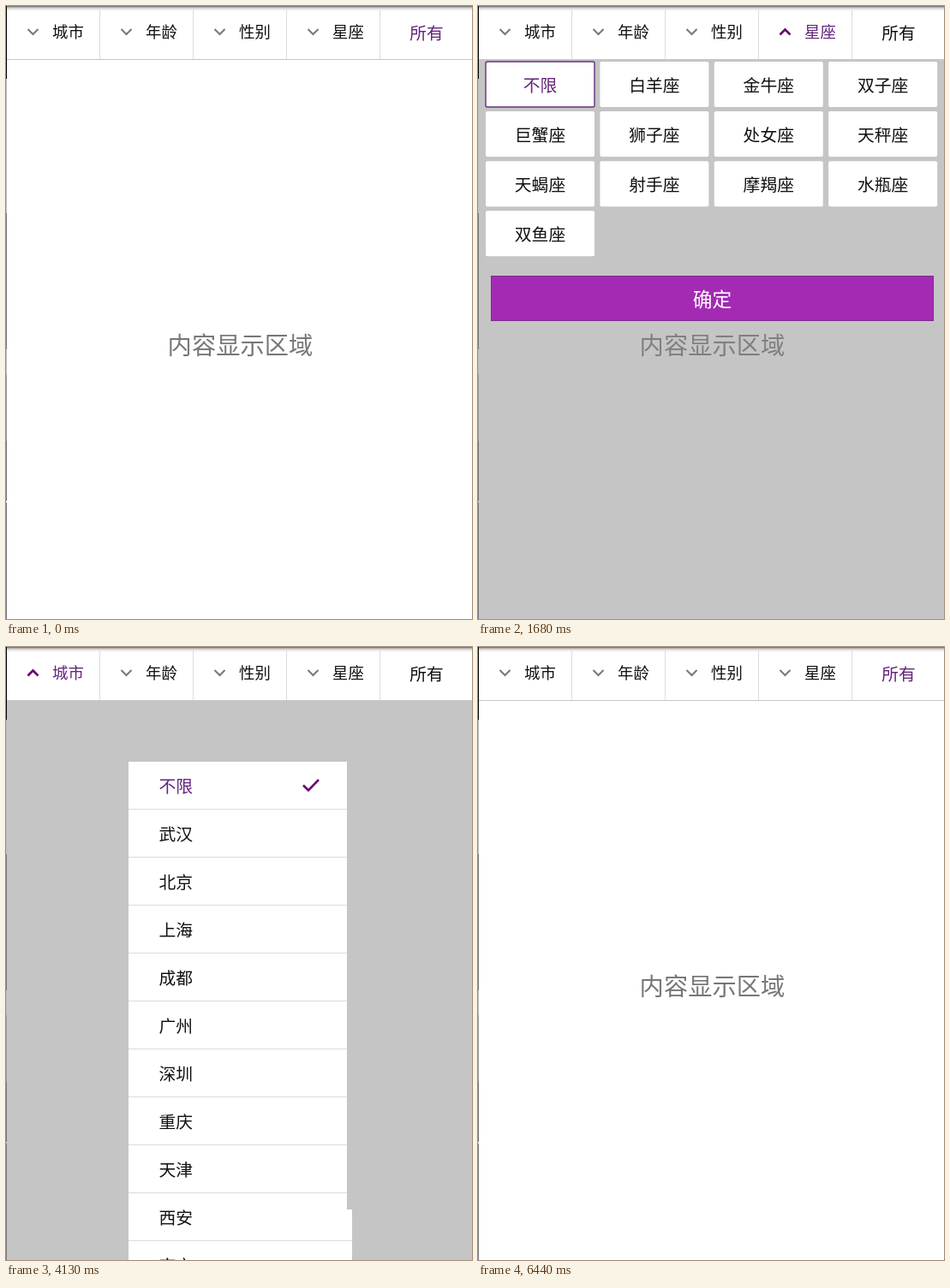
These frames come from a looping animation (544 px wide and 716 px high, 7.91 s). An HTML page:

```html
<!DOCTYPE html>
<html lang="zh-CN">
<head>
<meta charset="utf-8">
<title>筛选菜单</title>
<style>
  html, body { margin: 0; width: 100%; height: 100%; overflow: hidden; background: #fff; }
  svg { display: block; width: 544px; height: 716px; }
  text { font-family: "Noto Sans CJK SC", "Noto Sans CJK", "Noto Sans", sans-serif; fill: #111; }
  .mid { text-anchor: middle; }
  .on { fill: #64237c; }
  .hint { fill: #777; }
  .light { fill: #fff; }
  .line { fill: #dcdcdc; }
  .arrow { fill: none; stroke: #777; stroke-width: 2; }
  .tab.active text { fill: #64237c; }
  .tab.active .arrow { stroke: #6b0a72; stroke-width: 2.7; }
  .check { fill: none; stroke: #6b0a72; stroke-width: 2.6; }
  .panel { display: none; }
  .panel.show { display: inline; }
</style>
</head>
<body>
<svg viewBox="0 0 544 716">
  <defs>
    <clipPath id="below"><rect y="62" width="544" height="654"/></clipPath>
    <clipPath id="list"><rect x="143" y="134" width="261" height="593"/></clipPath>
    <linearGradient id="shade" x2="0" y2="1">
      <stop offset="0" stop-color="#555"/>
      <stop offset=".2" stop-color="#aaa"/>
      <stop offset=".55" stop-color="#e4e4e4"/>
      <stop offset="1" stop-color="#fff"/>
    </linearGradient>
  </defs>
  <rect width="544" height="716" fill="#fff"/>
  <g id="content"></g>
  <rect id="mask" y="62" width="544" height="654" fill="#888" opacity="0"/>
  <g clip-path="url(#below)"><g id="panels"></g></g>
  <g id="header"></g>
  <g id="edge"></g>
</svg>
<script>
const LOOP = 7910, STEP = 70, SLIDE = 350, DROP = 833;
const OPEN = 1330, CLOSE = 6090;
const SWITCH = [[OPEN, 3], [2450, 2], [3360, 1], [4130, 0], [CLOSE, 4]];

const $ = id => document.getElementById(id);
const rect = (x, y, w, h, attrs = '') =>
  `<rect x="${x}" y="${y}" width="${w}" height="${h}" ${attrs}/>`;
// cy is the middle of the glyphs
const text = (x, cy, size, str, cls = '') =>
  `<text x="${x}" y="${(cy + size * 0.38).toFixed(2)}" font-size="${size}" class="${cls}">${str}</text>`;

function rowPanel(items) {
  return items.map((s, i) => {
    const y = 63 + i * 56;
    return rect(0, y, 544, 56, `fill="${i ? '#fff' : '#f4f4f4'}"`) +
      rect(0, y + 55, 544, 1, 'class="line"') +
      text(273.5, y + 28, 19.8, s, i ? 'mid' : 'mid on');
  }).join('');
}

function cityPanel(items) {
  const rows = items.map((s, i) => {
    const y = 134 + i * 56;
    return rect(143, y + 55, 261, 1, 'class="line"') +
      text(178.5, y + 28, 19.8, s, i ? '' : 'on');
  }).join('');
  return `<g clip-path="url(#list)">${rect(143, 134, 261, 593, 'fill="#fff"')}${rows}</g>` +
    '<path class="check" d="M347 161.5l6 6 12-12.5"/>' +
    rect(398, 134, 6, 523, 'id="bar" fill="#cdcdcd"');
}

function gridPanel(items) {
  const cells = items.map((s, i) => {
    const x = 9 + (i % 4) * 133.4, y = 65 + Math.floor(i / 4) * 58.1;
    const edge = i ? '' : 'stroke="#64307f" stroke-width="1.4"';
    return rect(x, y, 127, 53, `rx="2" fill="#fff" ${edge}`) +
      text(x + 63.5, y + 27, 19.8, s, i ? 'mid' : 'mid on');
  }).join('');
  return cells +
    rect(15.5, 315.5, 516, 52, 'fill="#a42ab4" stroke="#7d2a8c"') +
    text(273.5, 342, 22.7, '确定', 'mid light');
}

function tab(name, i) {
  const x = i * 109;
  return `<g class="tab"><path class="arrow"/>${text(x + 54, 30.5, 18.4, name)}</g>` +
    rect(x + 109, 4, 1, 58, 'class="line"');
}

$('content').innerHTML = text(273.5, 396.5, 28.3, '内容显示区域', 'mid hint');
$('panels').innerHTML = [
  cityPanel(['不限', '武汉', '北京', '上海', '成都', '广州', '深圳', '重庆', '天津', '西安', '南京', '杭州']),
  rowPanel(['不限', '18岁以下', '18-22岁', '23-26岁', '27-35岁', '35岁以上']),
  rowPanel(['不限', '男', '女']),
  gridPanel(['不限', '白羊座', '金牛座', '双子座', '巨蟹座', '狮子座', '处女座',
    '天秤座', '天蝎座', '射手座', '摩羯座', '水瓶座', '双鱼座'])
].map(p => `<g class="panel">${p}</g>`).join('');
$('header').innerHTML = rect(0, 0, 544, 62, 'fill="#fff"') +
  rect(0, 0, 544, 6, 'fill="url(#shade)"') +
  ['城市', '年龄', '性别', '星座'].map(tab).join('') +
  `<g class="tab">${text(491, 31, 19.8, '所有', 'mid')}</g>` +
  rect(0, 62, 544, 1, 'fill="#c6c6c6"');
$('edge').innerHTML = [[0, 85, '#000'], [85, 157, '#bbb'], [242, 159, '#777'],
  [401, 29, '#bbb'], [430, 78, '#999'], [508, 70, '#776f74'], [580, 136, '#777']]
  .map(([y, h, c]) => rect(0, y, 1, h, `fill="${c}"`)).join('');

const tabs = [...document.querySelectorAll('.tab')];
const panels = [...document.querySelectorAll('.panel')];

const ease = (t, start) => {
  const k = Math.min(1, Math.max(0, (t - start) / SLIDE));
  return (1 - Math.cos(Math.PI * k)) / 2;
};

function draw(t) {
  const active = SWITCH.reduce((now, [at, i]) => t >= at ? i : now, 4);
  const shown = active < 4 ? active : t >= CLOSE ? 0 : 3;
  const open = ease(t, OPEN) - ease(t, CLOSE);

  tabs.forEach((el, i) => {
    const on = i === active, arrow = el.querySelector('.arrow');
    el.classList.toggle('active', on);
    if (arrow) {
      const x = i * 109 + 25.5;
      arrow.setAttribute('d', on ? `M${x} 33.5l6-6 6 6` : `M${x} 27l6 6 6-6`);
    }
  });
  panels.forEach((el, i) => el.classList.toggle('show', i === shown && open > 0));
  $('mask').setAttribute('opacity', 0.487 * open);
  $('panels').setAttribute('transform', `translate(0 ${(open - 1) * DROP})`);
  $('bar').setAttribute('fill', t < 4200 ? '#c5c5c5' : '#cdcdcd');
}

function tick() {
  draw(Math.floor(performance.now() % LOOP / STEP) * STEP);
  requestAnimationFrame(tick);
}
tick();
</script>
</body>
</html>
```
